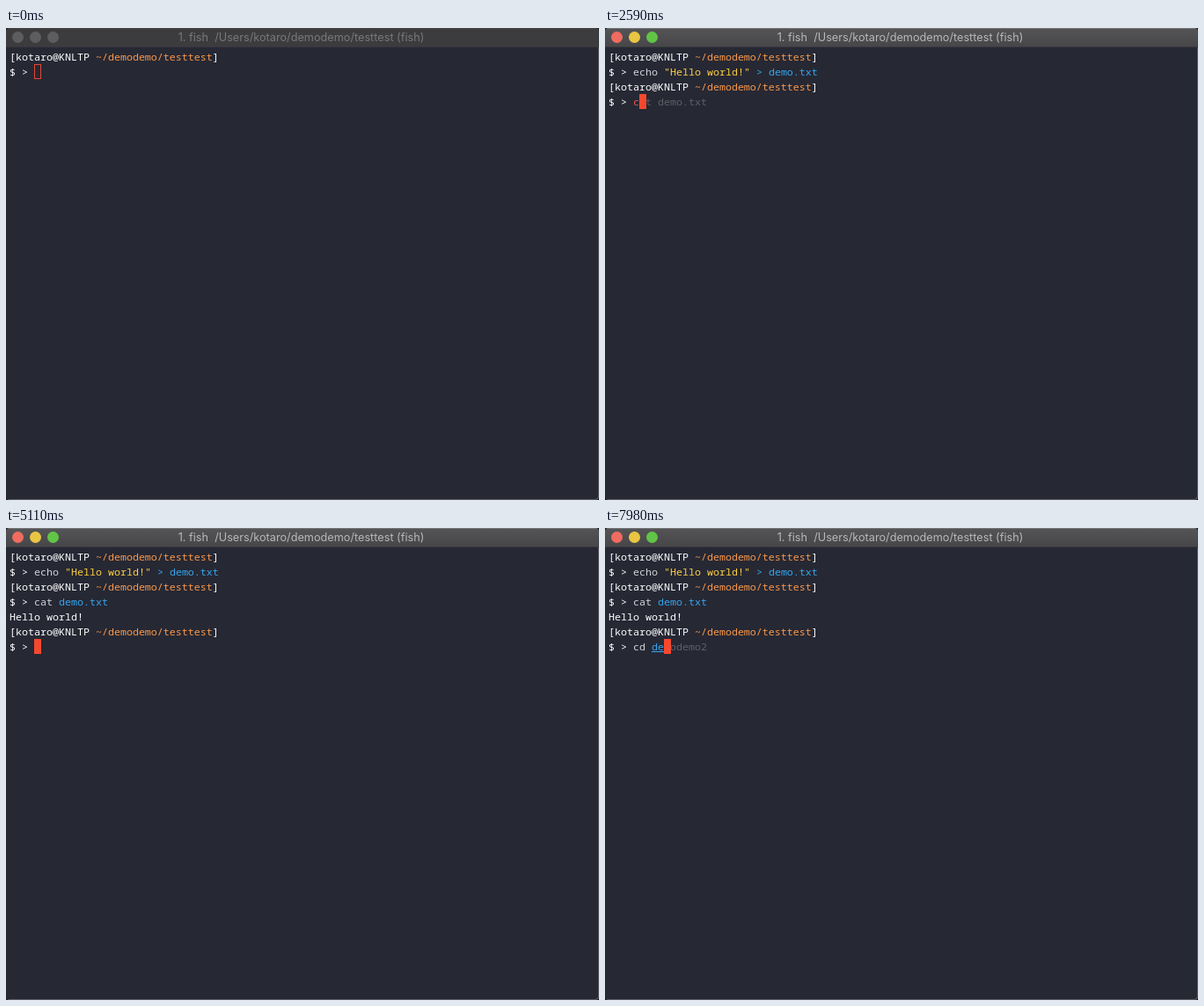
These frames come from a looping animation (674 px wide and 536 px high, 8 s). An HTML page:

```html
<!DOCTYPE html>
<html lang="en">
<head>
<meta charset="utf-8">
<title>Terminal</title>
<style>
  html, body { margin: 0; width: 100%; height: 100%; overflow: hidden; background: #1b1c24; }
  #window {
    position: absolute; left: 0; top: 0; width: 674px; height: 536px; box-sizing: border-box;
    overflow: hidden; background: #262834; border-radius: 4px;
  }
  #window::after {
    content: ""; position: absolute; inset: 22px 0 0; border-radius: 0 0 4px 4px;
    box-shadow: inset -1px -1px #5c5d63;
  }
  #bar {
    position: absolute; left: 0; top: 0; width: 100%; height: 22px; box-sizing: border-box;
    background: linear-gradient(#545456, #474749);
    border: solid #757577; border-width: 1px 0; border-bottom-color: #3a3a3e;
  }
  #title {
    position: absolute; left: 0; top: -1px; width: 671px; text-align: center; white-space: pre;
    font: 12.7px/21px Inter, sans-serif; color: #b8b8ba;
  }
  .light { position: absolute; top: 2.5px; width: 13px; height: 13px; border-radius: 50%; }
  .close { left: 6.5px; background: #f06b60; }
  .mini { left: 26.5px; background: #e9c544; }
  .zoom { left: 46.5px; background: #62c446; }

  #screen {
    position: absolute; left: 4px; top: 24px; white-space: pre; color: #fff;
    font: 500 calc(7px / 0.6)/17px "Noto Sans Mono", monospace; font-variant-ligatures: none;
  }
  #cursor {
    position: absolute; width: 8px; height: 17px; box-sizing: border-box;
    background: #f5492f; border: 1px solid #f5492f;
  }
  .path { color: #fb994a; }
  .cmd { color: #d2d3d8; }
  .err { color: #f64c4e; }
  .str { color: #ffcf42; }
  .arg { color: #36a6ee; }
  .dir { color: #36a6ee; text-decoration: underline; }
  .ghost { color: #5f6067; }

  .idle #bar { background: #3c3c3f; border-color: #444447 #000 #38383c; }
  .idle #title { color: #78787b; }
  .idle .light { background: #5d5d60; }
  .idle #cursor { background: none; border-color: #e04837; }
</style>
</head>
<body>
<div id="window" class="idle">
  <div id="bar">
    <i class="light close"></i><i class="light mini"></i><i class="light zoom"></i>
    <div id="title"></div>
  </div>
  <div id="screen"></div>
  <div id="cursor"></div>
</div>
<script>
  const LOOP = 8000, CELL = 7, ROW = 17, LEFT = 4, TOP = 24;
  const byId = id => document.getElementById(id);
  const span = (kind, text) => `<span class="${kind}">${text}</span>`;

  const PROMPT = "[kotaro@KNLTP " + span("path", "~/demodemo/testtest") + "]";
  const LEAD = "$ > ";
  const ECHO = 'echo "Hello world!" > demo.txt';
  const CAT = "cat demo.txt";
  const CD = "cd demodemo2";
  const HISTORY = [
    { command: ECHO, output: [] },
    { command: CAT, output: ["Hello world!"] }
  ];

  // Each step: start time, commands entered, characters typed, suggested line, running program
  const STEPS = [
    [0, 0, 0, ""],
    [630, 0, 1, ECHO],
    [770, 0, 2, ECHO],
    [910, 0, 3, ECHO],
    [1470, 0, ECHO.length, ECHO],
    [1820, 1, 0, "", "echo"],
    [1960, 1, 0, ""],
    [2590, 1, 1, CAT],
    [2730, 1, 2, CAT],
    [2870, 1, 3, CAT],
    [3010, 1, 4, CAT],
    [3920, 1, CAT.length, CAT],
    [4760, 2, 0, "", "cat"],
    [4900, 2, 0, ""],
    [6720, 2, 1, CAT],
    [7490, 2, 2, CD],
    [7630, 2, 3, CD],
    [7770, 2, 4, CD],
    [7910, 2, 5, CD]
  ];
  const FOCUS_AT = 70;

  function highlight(line) {
    let word = 0;
    return line.replace(/"[^"]*"?|\S+/g, token => {
      if (word++ === 0) return span(/^(echo|cat|cd)$/.test(token) ? "cmd" : "err", token);
      if (token[0] === '"') return span("str", token);
      return span(line.startsWith("cd ") ? "dir" : "arg", token);
    });
  }

  function draw([, entered, typed, line, program]) {
    const rows = HISTORY.slice(0, entered).flatMap(({ command, output }) =>
      [PROMPT, LEAD + highlight(command), ...output]);
    let column = 0, row = rows.length;
    if (!program) {
      rows.push(PROMPT, LEAD + highlight(line.slice(0, typed)) + span("ghost", line.slice(typed)));
      row += 1;
      column = LEAD.length + typed;
    }
    byId("screen").innerHTML = rows.join("\n");
    byId("title").textContent = `1. ${program || "fish"}  /Users/kotaro/demodemo/testtest (fish)`;
    byId("cursor").style.left = LEFT + column * CELL + "px";
    byId("cursor").style.top = TOP + row * ROW + "px";
  }

  let shown;
  function tick() {
    const time = performance.now() % LOOP;
    const step = STEPS.filter(([start]) => start <= time).pop();
    byId("window").classList.toggle("idle", time < FOCUS_AT);
    if (step !== shown) draw(shown = step);
    requestAnimationFrame(tick);
  }
  tick();
</script>
</body>
</html>
```
